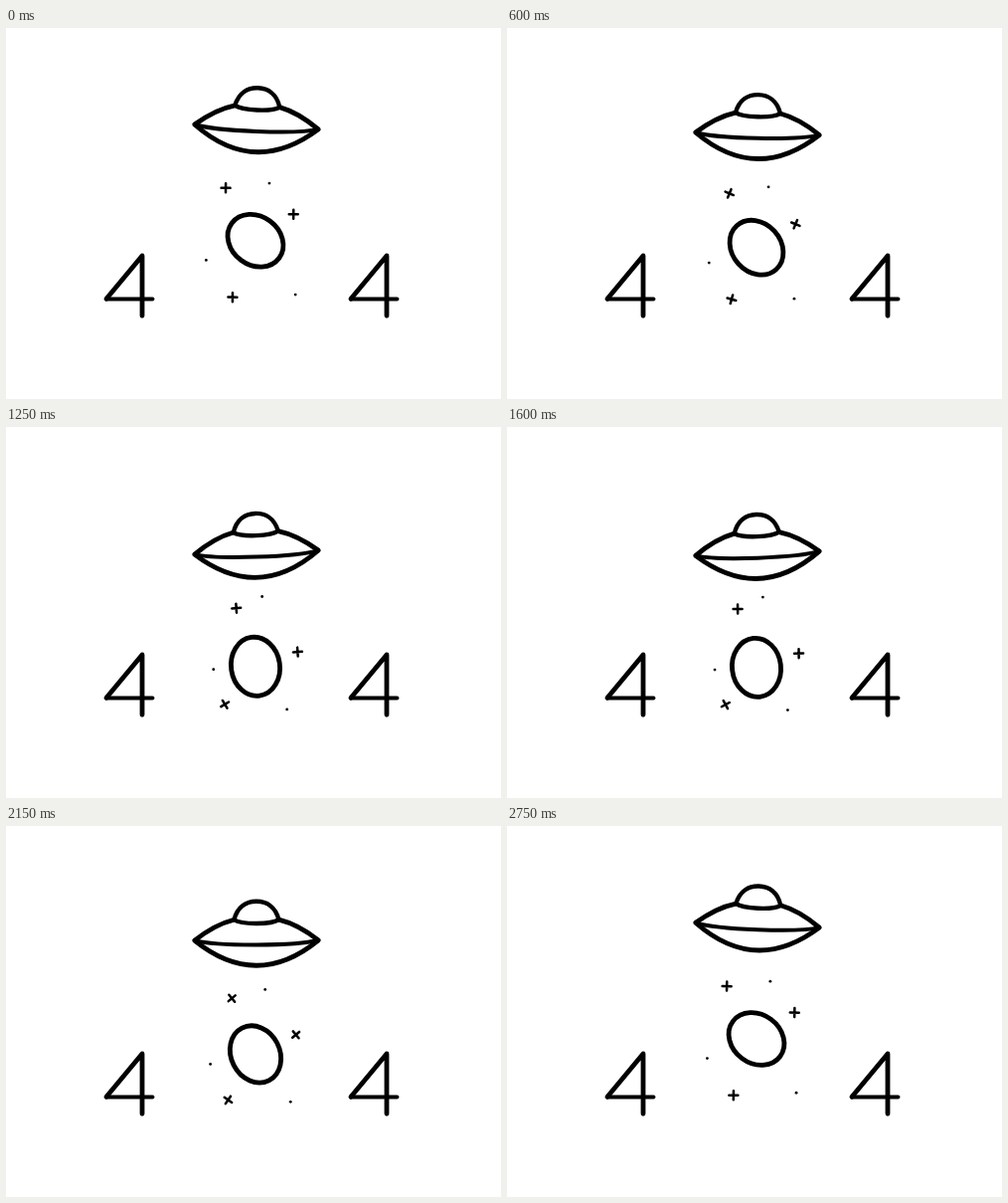
Write an HTML page that moves like this. It is 498 by 373 pixels and loops after 2800 ms.

```html
<!DOCTYPE html>
<html lang="en">
<head>
<meta charset="utf-8">
<title>404</title>
<style>
  html, body { margin: 0; width: 100%; height: 100%; overflow: hidden; background: #fff; }
  svg { display: block; width: 100vw; height: 100vh; }
</style>
</head>
<body>
<svg viewBox="0 0 498 373" fill="none" stroke="#000" stroke-width="4.8" stroke-linecap="round" stroke-linejoin="round">
  <defs>
    <g id="four">
      <path d="M137 289.3V229L101 272.3"/>
      <path d="M101 272.5H147.5" stroke-width="3.8"/>
    </g>
    <path id="star" d="M-4.5 0H4.5M0 -4.5V4.5" stroke-width="2.5"/>
    <circle id="dot" r="1.4" fill="#000" stroke="none"/>
  </defs>
  <use href="#four"/>
  <use href="#four" x="246"/>
  <g id="saucer">
    <path d="M-22.5 -20.8Q-42 -16 -62.3 0Q0 50.5 62.3 0Q42 -16 22.5 -20.8"/>
    <path d="M-62 0C-40 6 40 6 62 0" stroke-width="4"/>
    <path d="M-22.5 -20.8C-19 -34 -10 -39.2 0 -39.2S19 -34 22.5 -20.8Q17 -17 0 -17T-22.5 -20.8" stroke-width="4.4"/>
  </g>
  <ellipse id="planet" rx="24.5" ry="29.6"/>
  <g id="sky"></g>
</svg>
<script>
const LOOP = 2800, STEP = 50, LOWEST = 1490;

// Each item drifts from (x0, y0) to (x1, y1) while turning by the given angle.
const saucer = { el: document.getElementById('saucer'), path: [252, 99.3, 252, 127.4], turn: [2.3, -2.1] };
const planet = { el: document.getElementById('planet'), path: [251, 213.6, 251, 242.1], turn: [-54, -6] };
const sky = [
  ['star', [221, 160.7, 232.2, 183.2], 90],
  ['star', [289.2, 187, 293.6, 228], 90],
  ['star', [228, 270.6, 219.8, 279.2], 62],
  ['dot', [265, 156, 257.3, 171.2], 0],
  ['dot', [201.3, 233.4, 209.1, 244.2], 0],
  ['dot', [291.2, 268, 282.3, 284.7], 0],
].map(([shape, path, angle]) => {
  const el = document.createElementNS('http://www.w3.org/2000/svg', 'use');
  el.setAttribute('href', '#' + shape);
  document.getElementById('sky').append(el);
  return { el, path, turn: [0, angle] };
});
const items = [saucer, planet, ...sky];

const mix = (a, b, p) => a + (b - a) * p;

// cubic-bezier(.5, 0, .5, 1), solved by bisection
function ease(x) {
  let lo = 0, hi = 1;
  for (let i = 0; i < 24; i++) {
    const s = (lo + hi) / 2;
    if (1.5 * s * (1 - s) + s ** 3 < x) lo = s; else hi = s;
  }
  return lo * lo * (3 - 2 * lo);
}

function draw(now) {
  const t = Math.floor(now % LOOP / STEP) * STEP;
  const away = Math.abs(t - LOWEST);
  const p = ease(1 - Math.min(away, LOOP - away) / (LOOP / 2));
  for (const { el, path: [x0, y0, x1, y1], turn } of items) {
    el.setAttribute('transform',
      `translate(${mix(x0, x1, p)} ${mix(y0, y1, p)}) rotate(${mix(...turn, p)})`);
  }
}

const start = performance.now();
function tick() {
  draw(performance.now() - start);
  requestAnimationFrame(tick);
}
tick();
</script>
</body>
</html>
```
